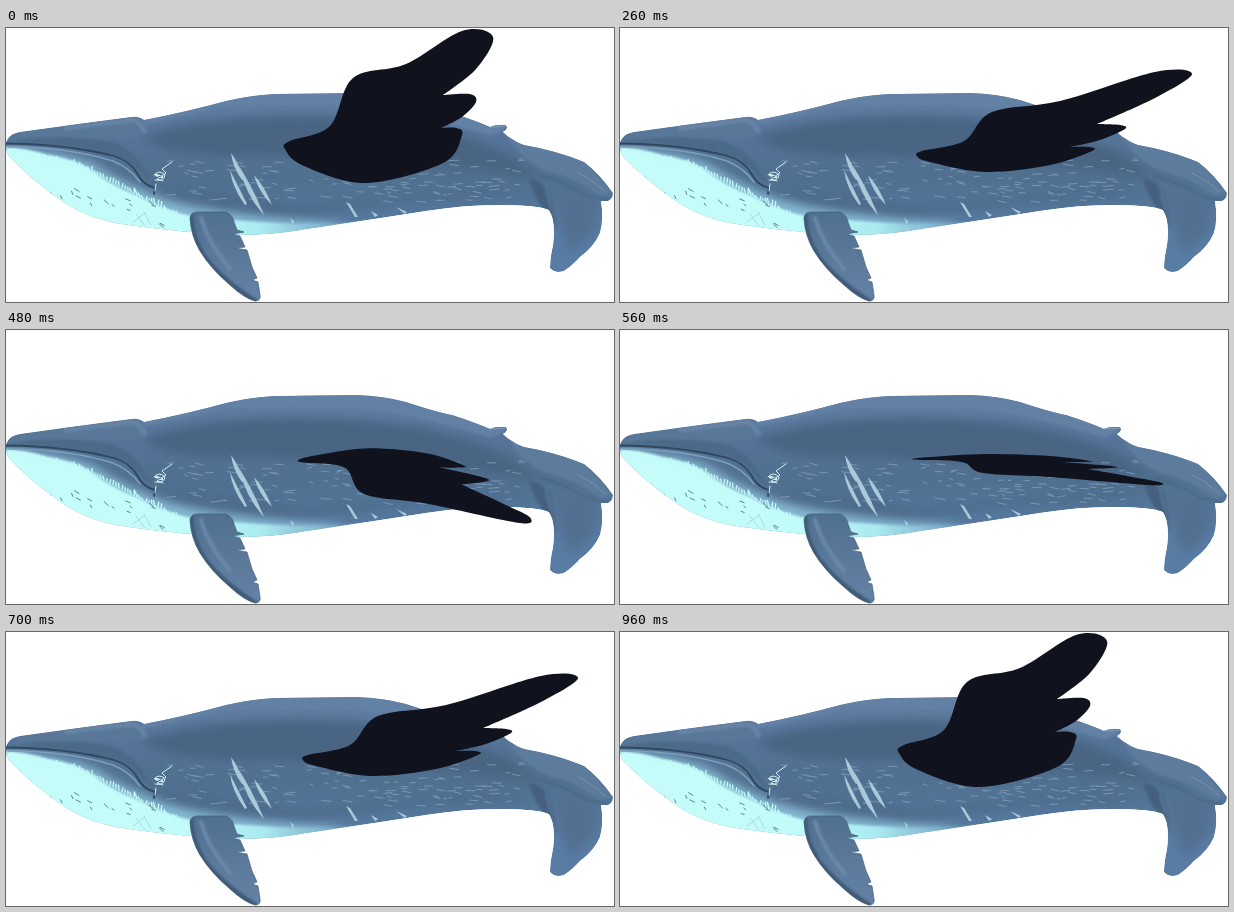
An HTML page for the animation above (980 ms loop, 608 by 274 pixels).

```html
<!DOCTYPE html>
<html lang="en">
<head>
<meta charset="utf-8">
<title>Winged whale</title>
<style>
  html, body { margin: 0; width: 100%; height: 100%; overflow: hidden; background: #fff; }
  svg { display: block; width: 100vw; height: 100vh; }
  .line { fill: none; stroke-linecap: round; stroke-linejoin: round; }
</style>
</head>
<body>
<svg viewBox="0 0 608 274">
  <defs>
    <path id="body" d="M0 115C2 108 7 105 14 104L50 99L95 93L126 89Q133 88 138 92Q180 84 220 73Q248 67 270 66L350 65Q378 66 400 72Q430 82 446 85Q468 92 484 99Q490 96 500 97Q503 101 497 104Q506 113 518 117Q552 123 578 134Q594 146 607 165Q607 171 602 173L595 173Q598 192 594 205Q588 219 574 229Q566 238 558 243Q549 246 544 240Q544 230 547 217Q550 193 543 182Q532 177 490 177Q458 177 420 183Q350 194 300 201Q270 207 225 207Q160 203 110 195Q84 190 62 177Q28 154 10 135Q1 128 0 121Z"/>
    <path id="fin" d="M184 190Q185 184 191 184L220 184Q227 187 228 194L231 202L238 204L226 206L234 208L239 219L229 220L241 222L246 239L251 250L246 252L252 254L254 267Q255 273 249 273Q238 270 224 257Q205 241 194 223Q185 208 184 190Z"/>
    <clipPath id="inBody"><use href="#body"/></clipPath>
    <clipPath id="inFin"><use href="#fin"/></clipPath>
    <linearGradient id="skin" x1="0" y1="65" x2="0" y2="205" gradientUnits="userSpaceOnUse">
      <stop offset="0" stop-color="#6381a4"/>
      <stop offset=".3" stop-color="#56749a"/>
      <stop offset=".6" stop-color="#50708f"/>
      <stop offset="1" stop-color="#587ca4"/>
    </linearGradient>
    <linearGradient id="pale" x1="0" y1="0" x2="370" y2="0" gradientUnits="userSpaceOnUse">
      <stop offset="0" stop-color="#c6fdfa"/>
      <stop offset=".47" stop-color="#c2fcf9"/>
      <stop offset=".7" stop-color="#a8e9f0"/>
      <stop offset="1" stop-color="#6f9dbd" stop-opacity="0"/>
    </linearGradient>
    <linearGradient id="finSkin" x1="0" y1="184" x2="0" y2="273" gradientUnits="userSpaceOnUse">
      <stop offset="0" stop-color="#50708f"/>
      <stop offset="1" stop-color="#6482a6"/>
    </linearGradient>
    <filter id="soft" x="-20%" y="-50%" width="140%" height="200%"><feGaussianBlur stdDeviation="5"/></filter>
    <filter id="fine" x="-20%" y="-50%" width="140%" height="200%"><feGaussianBlur stdDeviation="1.2"/></filter>
  </defs>

  <g clip-path="url(#inBody)">
    <use href="#body" fill="url(#skin)"/>
    <path fill="#4a6583" filter="url(#soft)" d="M136 110Q170 96 220 91Q310 83 400 95Q450 103 500 125L535 150Q470 142 400 137Q300 128 220 128Q160 127 136 110Z"/>
    <path fill="#4d6a8a" opacity=".8" filter="url(#soft)" d="M150 160Q220 160 290 176Q380 172 490 160L520 168Q400 172 290 190Q200 187 150 176Z"/>
    <path fill="#6381a4" filter="url(#fine)" d="M136 97Q180 88 222 78Q300 76 350 78Q410 84 485 108L500 100L400 60L260 55L136 80Z"/>
    <path fill="#587799" d="M0 115L14 104L126 88Q136 89 143 105Q120 113 98 110Q50 108 0 115Z" filter="url(#fine)"/>
    <path class="line" stroke="#6684a5" stroke-width="5" filter="url(#fine)" d="M60 100L126 92Q135 94 138 103"/>
    <path fill="#4c6988" filter="url(#fine)" d="M0 113Q60 106 105 114Q132 122 147 158Q128 133 108 128Q60 117 0 117Z"/>

    <path fill="#86b8d2" filter="url(#soft)" d="M0 119Q60 124 88 136Q112 152 145 166Q185 183 290 192L340 196L280 215L100 205L0 140Z"/>
    <path fill="url(#pale)" filter="url(#fine)" d="M0 119Q20 120 42 127Q72 132 85 142Q104 157 132 168Q158 182 185 188Q240 194 290 196L370 192L300 215L110 210L40 180L0 135Z"/>
    <g id="fringe" class="line" stroke="#c2faf8" stroke-width="1.4"/>
    <g id="grooves" class="line" stroke="#46627c" stroke-width=".8"/>
    <path class="line" stroke="#a7cfdf" stroke-width=".8" d="M130 186L139 198M138 184L145 197M127 194L139 185"/>

    <path class="line" stroke="#7ba0bc" stroke-width="1.4" d="M2 119Q62 119 107 133Q124 140 134 154"/>
    <path class="line" stroke="#30475f" stroke-width="1.8" d="M0 115.500Q60 116 108 128Q124 133 131 145Q137 157 149 160L148 166"/>

    <g id="flecks" class="line" stroke="#7796b2" stroke-width="1"/>

    <path fill="#45617f" filter="url(#fine)" d="M523 151Q535 152 539 160Q540 174 549 190L542 184Q530 176 523 151Z"/>
    <path fill="#5d7b9d" filter="url(#fine)" d="M500 106Q555 121 580 134L607 165L594 168Q570 150 540 143Q515 132 500 106Z"/>
    <path fill="#526f92" filter="url(#soft)" d="M552 165Q575 160 592 174L588 205L566 225Q550 204 552 165Z"/>
    <path class="line" stroke="#48637f" stroke-width="1.3" filter="url(#fine)" d="M535 148Q560 155 581 168L602 172M543 162Q548 180 550 200"/>
    <path class="line" stroke="#7592b0" stroke-width="1" d="M572 145Q589 153 599 164"/>
  </g>
  <path class="line" stroke="#829fbc" stroke-width="1" d="M485 99L500 98"/>

  <g fill="#a9cbd9">
    <path d="M225 125Q233 136 238 151L236 152Q227 140 225 125Z"/>
    <path d="M224 142Q232 158 241 176L239 177Q226 159 224 142Z"/>
    <path d="M233 138Q247 160 258 187Q240 168 233 138Z"/>
    <path d="M248 147Q259 159 266 177Q253 165 248 147Z"/>
    <path d="M340 174L344 176L352 189L349 189Z"/>
    <path d="M390 179L401 184L399 186Z"/>
    <path d="M365 183L372 187L369 189Z"/>
    <path d="M284 190L288 193L287 197Z"/>
  </g>

  <g class="line" stroke="#d4edf0">
    <path stroke-width="1" d="M166 134L156 141L160 145L151 151L157 153M148 147Q153 141 159 147Q158 154 149 152M150 156L149 163"/>
    <path stroke-width="2.400" d="M150 147L156 149"/>
    <path stroke-width=".8" stroke="#2f4860" d="M152 149L155 148"/>
  </g>

  <g clip-path="url(#inFin)">
    <use href="#fin" fill="url(#finSkin)"/>
    <path class="line" stroke="#3f5a77" stroke-width="5" filter="url(#fine)" d="M185 184Q184 207 199 230Q217 253 249 273"/>
    <path class="line" stroke="#6b89aa" stroke-width="4" filter="url(#fine)" d="M195 190Q202 215 224 241"/>
  </g>
  <use href="#fin" fill="none" stroke="#435f7c" stroke-width=".8"/>

  <path id="wing" fill="#10121e"/>
</svg>
<script>
const $ = id => document.getElementById(id);

let seed = 7;
const rand = (a, b) => {
  seed = (seed * 16807) % 2147483647;
  return a + (b - a) * seed / 2147483647;
};

function strokes(id, count, make) {
  let d = '';
  for (let i = 0; i < count; i++) {
    const [x, y, dx, dy] = make(i / count);
    d += `M${x.toFixed(1)} ${y.toFixed(1)}l${dx.toFixed(1)} ${dy.toFixed(1)}`;
  }
  const path = document.createElementNS('http://www.w3.org/2000/svg', 'path');
  path.setAttribute('d', d);
  $(id).append(path);
}

// Ragged upper edge of the belly
strokes('fringe', 55, k => {
  const x = 8 + 165 * k;
  const y = x < 75 ? 121 + x * 0.18 : 134.5 + (x - 75) * 0.51;
  return [x, y + 4, rand(-2, 1), -rand(2, 6)];
});
strokes('grooves', 17, () => {
  const x = rand(42, 155);
  return [x, rand(145, 166) + (x - 42) * 0.27, rand(1, 5), rand(1, 4)];
});
strokes('flecks', 115, () => {
  const x = rand(160, 515);
  return [x, rand(133, 174) - Math.max(0, x - 420) * 0.04, rand(3, 10), rand(-1, 2)];
});

// Wing outline at the key moments of the downstroke
const poses = [
  '279,121 284,113 324,98 347,50 400,36 456,3 487,9 470,41 437,67 464,66 470,74 456,89 435,100 450,100 456,107 437,135 360,155 298,138',
  '291,133 295,124 337,111 360,67 420,51 475,26 509,32 490,58 459,86 480,88 486,95 468,108 445,115 460,117 467,122 440,145 365,160 310,147',
  '297,128 302,123 344,113 372,84 440,73 535,44 572,46 535,70 477,96 500,97 505,101 480,112 450,119 469,119 472,123 430,137 365,144 310,134',
  '292,129 300,130 342,132 363,143 430,147 528,155 542,153 518,148 468,139 491,138 497,137 480,135 444,132 465,132 470,131 430,126 365,124 310,127'
].map(s => s.split(' ').map(p => p.split(',').map(Number)));
poses.push(poses[3].map(([x, y]) => [292 + (x - 292) * 0.93, 128 + (y - 128) * 2.4]));

const times = [0, 120, 260, 400, 480];
const notches = [8, 12];
const LOOP = 980, STEP = 20, TURN = 480;

function slope(v, i) {
  if (i === 0 || i === times.length - 1) return 0;
  return (v(i + 1) - v(i - 1)) / (times[i + 1] - times[i - 1]);
}

function between(v, t) {
  let i = 0;
  while (i < times.length - 2 && t >= times[i + 1]) i++;
  const span = times[i + 1] - times[i];
  const u = (t - times[i]) / span, u2 = u * u, u3 = u2 * u;
  return (2 * u3 - 3 * u2 + 1) * v(i) + (3 * u2 - 2 * u3) * v(i + 1)
    + span * ((u3 - 2 * u2 + u) * slope(v, i) + (u3 - u2) * slope(v, i + 1));
}

function outline(pts) {
  const n = pts.length;
  const at = i => pts[(i + n) % n];
  const handle = i => notches.includes(i % n) ? [0, 0]
    : [0, 1].map(k => (at(i + 1)[k] - at(i - 1)[k]) / 6);
  let d = 'M' + pts[0];
  for (let i = 0; i < n; i++) {
    const a = at(i), b = at(i + 1), h = handle(i), g = handle(i + 1);
    d += `C${a[0] + h[0]} ${a[1] + h[1]} ${b[0] - g[0]} ${b[1] - g[1]} ${b[0]} ${b[1]}`;
  }
  return d + 'Z';
}

function draw() {
  const now = Math.floor(performance.now() % LOOP / STEP) * STEP;
  const t = TURN - Math.abs(TURN - now);
  const pts = poses[0].map((_, p) => [0, 1].map(k => between(i => poses[i][p][k], t)));
  $('wing').setAttribute('d', outline(pts));
  requestAnimationFrame(draw);
}
draw();
</script>
</body>
</html>
```
